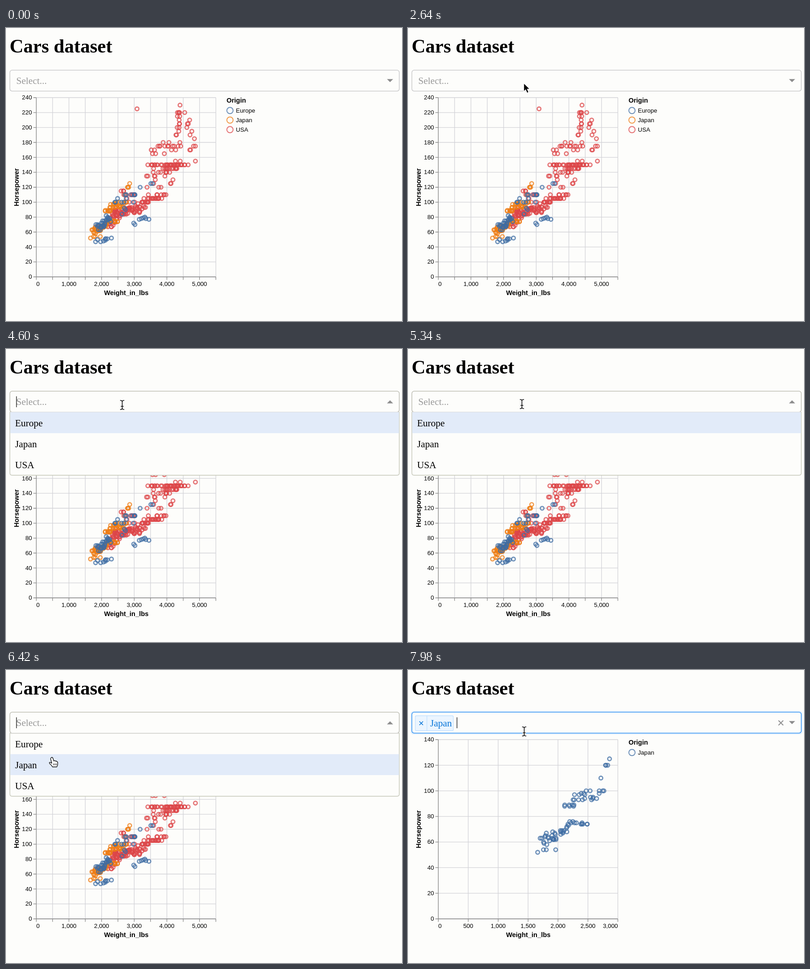
Recreate the animation shown at these times as an HTML page. Size 869x644 px, loop 8000 ms.

```html
<!DOCTYPE html>
<html lang="en">
<head>
<meta charset="utf-8">
<title>Cars dataset</title>
<style>
  html, body { margin: 0; width: 100%; height: 100%; overflow: hidden; background: #fdfdfb; }
  svg { display: block; }
  text { font: 13.13px "Liberation Sans", Arial, sans-serif; }
  .title { font-weight: bold; font-size: 14.44px; }
  .page { font: 21px "Liberation Serif", "Times New Roman", serif; }
  .heading { font: bold 42px "Liberation Serif", "Times New Roman", serif; }
  .grid { stroke: #d3d3d8; stroke-width: 1.3; fill: none; }
  .axis { stroke: #888; stroke-width: 1.3; fill: none; }
  .mark { fill: none; stroke-width: 2.6; opacity: .75; }
</style>
</head>
<body>
<svg width="869" height="644" viewBox="0 0 869 644">
  <text class="heading" x="8" y="53.5">Cars dataset</text>
  <g id="allChart"></g>
  <g id="japanChart"></g>

  <rect id="glow" x="5.5" y="90" width="860.5" height="52" rx="7" fill="#007eff" opacity=".1"/>
  <rect id="control" x="8.5" y="92.7" width="854.5" height="46" rx="5" fill="#fdfdfb" stroke-width="1.3"/>
  <text id="placeholder" class="page" x="22.5" y="122.5" fill="#999">Select...</text>
  <g id="tag">
    <rect x="16" y="100.5" width="83.5" height="33" rx="2.5" fill="#ebf5ff" stroke="#c2e0ff" stroke-width="1.3"/>
    <path d="M41.5 100.5v33" stroke="#c2e0ff" stroke-width="1.3"/>
    <path d="M25 113l8 8m0-8l-8 8" stroke="#0875d8" stroke-width="1.6"/>
    <text class="page" x="48.5" y="123.5" fill="#0875d8">Japan</text>
    <path d="M813 111l10.5 10.5m0-10.5l-10.5 10.5" stroke="#8f8f8f" stroke-width="2"/>
  </g>
  <path id="toggle" fill="#8c8c8c"/>
  <path id="caret" d="M0 104v24" stroke="#222" stroke-width="1.4"/>

  <g id="menu">
    <path d="M8.5 139H863V272.5q0 5-5 5H13.5q-5 0-5-5z" fill="#fdfdfb" stroke="#c4c6b7" stroke-width="1.4"/>
    <path d="M9 138.7h853.5" stroke="#dcdcdc" stroke-width="1.3"/>
    <rect id="hover" x="9.2" width="853.2" height="46" fill="#e2ebf9"/>
    <g id="options"></g>
  </g>

  <g id="pointer">
    <path id="arrow" d="M0 0V18.5L4.2 14.6 7.2 21.8 10.7 20.3 7.7 13.3H13.3Z" stroke="#fff" stroke-width="1.2"/>
    <g id="beam" fill="none" stroke="#111" stroke-width="1.6" stroke-linecap="round">
      <path id="beamShape" d="M-4-10Q0-10 0-7Q0-10 4-10M0-7V7M-4 10Q0 10 0 7Q0 10 4 10M-2.5 3H2.5"/>
    </g>
    <g id="hand" fill="#fff" stroke="#111" stroke-width="1.4" stroke-linejoin="round">
      <path d="M-4-10Q-1.5-12.5 0-9L2-3Q4-5 5.5-2.5Q7.5-4 8.5-1.5Q10.5-2 10.5 1Q11 6 8.5 10H-1Q-3 6-7 3Q-9-.5-6 0L-2.5 2-5-7Q-5.5-9-4-10Z"/>
      <path d="M1.5 2.5v4m3-4v4m3-4v4" fill="none" stroke-width="1.1"/>
    </g>
  </g>
</svg>
<script>
const LOOP = 8000, FOCUS = 3380, OPEN = 4600, PICK = 6960, REDRAW = 7120;
const LEFT = 66.5, TOP = 153, SIZE = 394, BOTTOM = TOP + SIZE;
const COLORS = { Europe: '#3d6ca3', Japan: '#ee7c14', USA: '#dc4648' };
const $ = id => document.getElementById(id);
const mix = (a, b, k) => a + (b - a) * k;

let seed = 7;
const random = () => (seed = seed * 16807 % 2147483647) / 2147483647;
const jitter = size => (random() * 2 - 1) * size;

// Cars spread along a line from one weight and horsepower to another.
// Strong engines come in steps of 5 horsepower.
function cloud(count, [w0, hp0], [w1, hp1], spreadW, spreadHp) {
  return Array.from({ length: count }, (_, i) => {
    const k = (i + random()) / count;
    const hp = mix(hp0, hp1, k) + jitter(spreadHp), step = hp > 98 ? 5 : 1;
    return [mix(w0, w1, k) + jitter(spreadW), Math.round(hp / step) * step];
  });
}

const cars = {
  Europe: [
    ...cloud(28, [1850, 64], [2240, 80], 60, 7),
    ...cloud(9, [1840, 47], [2300, 52], 40, 2),
    ...cloud(16, [2450, 92], [3050, 108], 100, 11),
    ...cloud(8, [2980, 68], [3450, 82], 100, 6),
    ...cloud(3, [3050, 120], [3800, 130], 40, 4)
  ],
  Japan: [
    ...cloud(32, [1720, 61], [2150, 69], 50, 4),
    ...cloud(12, [2130, 75], [2520, 75], 50, 1),
    ...cloud(7, [2100, 88], [2290, 89], 20, 1),
    ...cloud(21, [2230, 95], [2760, 97], 40, 3),
    ...cloud(5, [2740, 110], [2920, 130], 60, 4),
    ...cloud(4, [1640, 53], [1990, 53], 40, 1)
  ],
  USA: [
    [3086, 225],
    ...cloud(15, [4330, 185], [4360, 230], 60, 4),
    ...cloud(13, [4640, 212], [4900, 165], 190, 14),
    ...cloud(20, [3520, 172], [4450, 172], 80, 9),
    ...cloud(26, [3400, 150], [4650, 150], 50, 0),
    ...cloud(22, [3950, 144], [4400, 152], 150, 6),
    ...cloud(16, [3300, 136], [4250, 134], 120, 9),
    ...cloud(4, [3400, 120], [3950, 122], 60, 4),
    ...cloud(32, [3200, 101], [3950, 109], 90, 4),
    ...cloud(64, [2300, 86], [3250, 91], 120, 5),
    ...cloud(14, [2600, 112], [3050, 102], 70, 6),
    ...cloud(26, [1960, 67], [2550, 79], 80, 7)
  ]
};
const origins = Object.keys(cars);

const label = (x, y, text, anchor = 'start', extra = '') =>
  `<text x="${x}" y="${y}" text-anchor="${anchor}" ${extra}>${text}</text>`;
const circle = (x, y, r, color, extra = '') =>
  `<circle class="mark" cx="${x}" cy="${y}" r="${r}" stroke="${color}" ${extra}/>`;

function chart(maxWeight, maxPower, labelStep, series) {
  const px = w => LEFT + w / maxWeight * SIZE, py = hp => BOTTOM - hp / maxPower * SIZE;
  let grid = '', ticks = '', out = '';
  for (let w = 0; w <= maxWeight; w += 500) {
    grid += `M${px(w)} ${TOP}V${BOTTOM}`;
    ticks += `M${px(w)} ${BOTTOM}v6.5`;
    const anchor = w === 0 ? 'start' : w === maxWeight ? 'end' : 'middle';
    if (w % labelStep === 0) out += label(px(w), 567.3, w.toLocaleString('en-US'), anchor);
  }
  for (let hp = 0; hp <= maxPower; hp += 20) {
    grid += `M${LEFT} ${py(hp)}h${SIZE}`;
    ticks += `M${LEFT} ${py(hp)}h-6.5`;
    out += label(57, py(hp) + 4.3, hp, 'end');
  }
  out = `<path class="grid" d="${grid}"/><path class="axis" d="${ticks}M${LEFT} ${TOP}V${BOTTOM}H${LEFT + SIZE}"/>` + out;
  out += label(264, 587, 'Weight_in_lbs', 'middle', 'class="title"');
  out += label(0, 0, 'Horsepower', 'middle', 'class="title" transform="translate(27.5 350) rotate(-90)"');
  out += label(484, 164, 'Origin', 'start', 'class="title"');
  series.forEach(({ name, color }, i) => {
    const y = 181.3 + i * 21;
    out += circle(491.5, y, 6.9, color, 'style="stroke-width:2"') + label(504.5, y + 4.4, name);
  });
  // The largest group goes to the back.
  for (const { name, color } of [...series].sort((a, b) => cars[b.name].length - cars[a.name].length))
    for (const [w, hp] of cars[name]) out += circle(px(w), py(hp), 4.05, color);
  return out;
}

$('allChart').innerHTML = chart(5500, 240, 1000, origins.map(name => ({ name, color: COLORS[name] })));
$('japanChart').innerHTML = chart(3000, 140, 500, [{ name: 'Japan', color: COLORS.Europe }]);
$('options').innerHTML = origins.map((name, i) => label(20, 169.5 + i * 46, name, 'start', 'class="page"')).join('');

// White outline behind the text cursor.
const outline = $('beamShape').cloneNode();
outline.setAttribute('stroke', '#fff');
outline.setAttribute('stroke-width', 3.4);
$('beam').prepend(outline);

// Pointer path: time, x, y.
const path = [
  [450, 640, 650], [820, 601, 367], [1130, 488, 299], [1240, 488, 299], [1560, 307, 155],
  [1900, 239, 104], [2350, 254, 121], [4700, 255, 123], [5200, 250, 121], [5500, 250, 121],
  [6350, 103, 203], [7120, 103, 203], [7800, 255, 135], [LOOP, 255, 135]
];
function pointerAt(t) {
  const i = path.findIndex(key => key[0] > t);
  if (i < 1) return path[0].slice(1);
  const [t0, x0, y0] = path[i - 1], [t1, x1, y1] = path[i];
  const u = (t - t0) / (t1 - t0), k = u * u * (3 - 2 * u);
  return [mix(x0, x1, k), mix(y0, y1, k)];
}

const show = (id, on) => $(id).style.display = on ? '' : 'none';

function render(t) {
  const focused = t >= FOCUS, open = t >= OPEN && t < PICK, picked = t >= PICK;
  const [x, y] = pointerAt(t);
  show('allChart', t < REDRAW);
  show('japanChart', t >= REDRAW);
  show('menu', open);
  show('tag', picked);
  show('placeholder', !picked);
  show('glow', focused && !open);
  $('control').setAttribute('stroke', open ? '#b3b3a8' : focused ? '#1583f2' : '#c2c2c4');
  $('toggle').setAttribute('d', open ? 'M836 119.5h13.5l-6.75-6.8z' : 'M836 112.3h13.5l-6.75 6.8z');
  $('hover').setAttribute('y', y > 185 ? 185 : 139);

  show('caret', focused && (t - (picked ? PICK : FOCUS)) % 1000 < 500);
  $('caret').setAttribute('transform', `translate(${picked ? 107.5 : 23} 0)`);

  const shape = open && y > 139 ? 'hand' : focused && y < 139 ? 'beam' : 'arrow';
  for (const id of ['arrow', 'beam', 'hand']) show(id, id === shape);
  show('pointer', t >= path[0][0]);
  $('pointer').setAttribute('transform', `translate(${x} ${y})`);
}

const start = performance.now();
function frame() {
  render((performance.now() - start) % LOOP);
  requestAnimationFrame(frame);
}
render(0);
requestAnimationFrame(frame);
</script>
</body>
</html>
```
